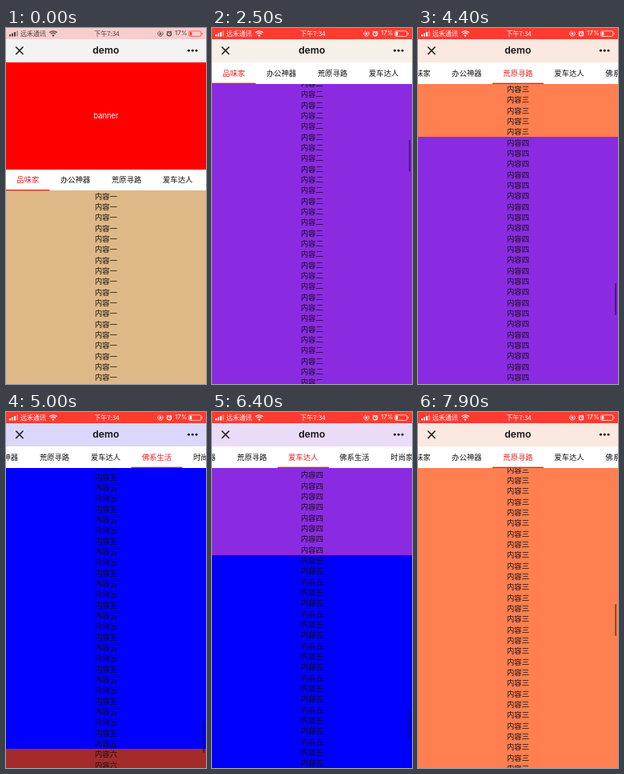
Animation of 250 by 445 pixels, one loop 8000 ms. Source, as an HTML page with a canvas:

```html
<!DOCTYPE html>
<html lang="zh">
<head>
<meta charset="utf-8">
<title>demo</title>
<style>
html, body { margin: 0; width: 100%; height: 100%; overflow: hidden; background: #fff; }
canvas { display: block; width: 250px; height: 445px; }
</style>
</head>
<body>
<canvas id="stage"></canvas>
<script>
const W = 250, H = 445, LOOP = 8000, STEP = 100;
const PT = 2 / 3;
const STATUS_H = 14, NAV_BOTTOM = 65 * PT, BANNER_H = 200 * PT, TAB_H = 40 * PT;
const CONTENT_TOP = NAV_BOTTOM + BANNER_H + TAB_H;
const ROW = 20 * PT, FONT = 14 * PT;
const SWITCH_LINE = 23, TAB_SLIDE = 300;
const CJK = '"Noto Sans CJK SC", "Noto Sans CJK", "Noto Sans", sans-serif';
const LATIN = 'Inter, Roboto, sans-serif';
const RED = [255, 59, 48], WHITE = [255, 255, 255];

const canvas = document.getElementById('stage');
const ctx = canvas.getContext('2d');
const dpr = window.devicePixelRatio || 1;
canvas.width = W * dpr;
canvas.height = H * dpr;

const clamp = (v, lo, hi) => Math.min(hi, Math.max(lo, v));
const mix = (a, b, p) => a.map((v, i) => v + (b[i] - v) * p);
const css = c => `rgb(${c.map(Math.round).join(',')})`;

// Page layout
const sections = [
  { label: '内容一', rows: 60, color: [222, 184, 135] },
  { label: '内容二', rows: 55, color: [138, 43, 226] },
  { label: '内容三', rows: 87, color: [255, 127, 80] },
  { label: '内容四', rows: 42, color: [138, 43, 226] },
  { label: '内容五', rows: 30, color: [0, 0, 255] },
  { label: '内容六', rows: 13, color: [165, 42, 42] }
];
let pageY = CONTENT_TOP;
for (const s of sections) {
  s.top = pageY;
  pageY += s.rows * ROW;
}
const MAX_SCROLL = pageY - 667 * PT;

const tabs = ['品味家', '办公神器', '荒原寻路', '爱车达人', '佛系生活', '时尚家居']
  .map(label => ({ label, w: label.length * FONT + 40 * PT }));
let stripW = 0;
for (const tab of tabs) {
  tab.x = stripW;
  stripW += tab.w;
}
const tabTarget = i => clamp(tabs[i].x + tabs[i].w / 2 - W / 2, 0, stripW - W);

// Scroll position: monotone cubic through a few poses
const poses = [
  [0, 0], [600, 0], [1500, 464.2], [3500, 1559.2], [5000, 3435.7], [5400, MAX_SCROLL],
  [6000, MAX_SCROLL], [6700, 2873], [6900, 2532.7], [7900, 1964.6], [8000, 1961.6]
];
const secant = i => (poses[i + 1][1] - poses[i][1]) / (poses[i + 1][0] - poses[i][0]);
const slopes = poses.map((_, i) => {
  if (i === 0 || i === poses.length - 1) return 0;
  const a = secant(i - 1), b = secant(i);
  return a * b > 0 ? 2 * a * b / (a + b) : 0;
});

function scrollAt(t) {
  let i = 0;
  while (i < poses.length - 2 && t >= poses[i + 1][0]) i++;
  const [t0, y0] = poses[i], [t1, y1] = poses[i + 1];
  const d = t1 - t0, u = (t - t0) / d, v = 1 - u;
  return y0 * (1 + 2 * u) * v * v + slopes[i] * d * u * v * v
    + y1 * u * u * (3 - 2 * u) - slopes[i + 1] * d * u * u * v;
}

function activeTab(scroll) {
  let active = 0;
  sections.forEach((s, i) => { if (s.top - scroll <= SWITCH_LINE) active = i; });
  return active;
}

// Times at which the highlighted tab changes
const switches = [];
for (let t = 0, last = 0; t < LOOP; t += 2) {
  const tab = activeTab(scrollAt(t));
  if (tab !== last) switches.push({ t, tab });
  last = tab;
}

function stripOffset(t) {
  let from = 0, to = 0, start = -TAB_SLIDE;
  const at = time => {
    const left = 1 - clamp((time - start) / TAB_SLIDE, 0, 1);
    return to + (from - to) * left * left;
  };
  for (const s of switches) {
    if (s.t > t) break;
    from = at(s.t);
    to = tabTarget(s.tab);
    start = s.t;
  }
  return at(t);
}

// Drawing helpers
function rect(x, y, w, h, color) {
  ctx.fillStyle = color;
  ctx.fillRect(x, y, w, h);
}

// Full-width band with edges on whole pixels, so neighbours leave no seam
function band(top, bottom, color) {
  const y = Math.round(top);
  rect(0, y, W, Math.round(bottom) - y, color);
}

function text(str, x, y, font, color, align = 'center') {
  ctx.font = font;
  ctx.fillStyle = color;
  ctx.textAlign = align;
  ctx.textBaseline = 'middle';
  ctx.fillText(str, x, y);
}

function arc(x, y, r, a = 0, b = Math.PI * 2) {
  ctx.beginPath();
  ctx.arc(x, y, r, a, b);
}

function line(...points) {
  ctx.beginPath();
  for (let i = 0; i < points.length; i += 2) ctx.lineTo(points[i], points[i + 1]);
  ctx.stroke();
}

function drawPage(scroll) {
  band(NAV_BOTTOM - scroll, NAV_BOTTOM + BANNER_H - scroll, '#f00');
  text('banner', W / 2, 110.5 - scroll, `${FONT}px ${LATIN}`, '#fff');
  for (const s of sections) {
    const y = s.top - scroll, h = s.rows * ROW;
    if (y > H || y + h < 0) continue;
    band(y, s === sections.at(-1) ? H : y + h, css(s.color));
    const first = Math.max(0, Math.floor(-y / ROW));
    for (let r = first; r < s.rows && y + r * ROW < H; r++) {
      text(s.label, W / 2, y + (r + 0.5) * ROW + 0.1, `${FONT}px ${CJK}`, '#111');
    }
  }
}

function drawTabs(t, scroll) {
  const y = Math.max(NAV_BOTTOM, NAV_BOTTOM + BANNER_H - scroll);
  const offset = stripOffset(t), active = activeTab(scroll);
  band(y, y + TAB_H, '#fff');
  tabs.forEach((tab, i) => {
    const x = tab.x - offset;
    text(tab.label, x + tab.w / 2, y + 13.1, `${FONT}px ${CJK}`, i === active ? '#e8201c' : '#111');
    if (i === active) rect(x, y + TAB_H - 2 * PT, tab.w, 2 * PT, '#d92a20');
  });
}

function colorBehind(y) {
  if (y < NAV_BOTTOM) return [200, 200, 200];
  if (y < NAV_BOTTOM + BANNER_H) return [255, 0, 0];
  return sections.filter(s => s.top <= y).pop()?.color || sections[0].color;
}

// Frosted bar: average of the colours underneath, mostly covered by white
function drawNav(scroll) {
  let tint = [0, 0, 0];
  const samples = 15;
  for (let i = 0; i < samples; i++) {
    const c = colorBehind(STATUS_H + i * 2 + scroll);
    tint = tint.map((v, k) => v + c[k] / samples);
  }
  band(STATUS_H, NAV_BOTTOM, css(mix(tint, [250, 250, 250], 0.855)));
  ctx.strokeStyle = '#111';
  ctx.lineWidth = 1.4;
  line(12.3, 23.5, 21.5, 32.9);
  line(21.5, 23.5, 12.3, 32.9);
  text('demo', 124.8, 28.5, `600 12.2px ${LATIN}`, '#111');
  ctx.fillStyle = '#111';
  for (const x of [228.4, 233.2, 238]) {
    arc(x, 28.2, 1.45);
    ctx.fill();
  }
}

function drawStatus(t) {
  const p = clamp(t / 500, 0, 1);
  const ink = css(mix([75, 65, 65], WHITE, p));
  band(0, STATUS_H, css(mix([248, 205, 203], RED, p)));
  for (let i = 0; i < 4; i++) {
    ctx.globalAlpha = i < 3 ? 1 : 0.4;
    rect(4 + i * 3, 8 - i * 1.5, 2, 2.5 + i * 1.5, ink);
  }
  ctx.globalAlpha = 1;
  text('远禾通讯', 18, 7, `8px ${CJK}`, ink, 'left');
  text('下午7:34', 126, 7, `8px ${CJK}`, ink);
  text('17%', 211, 7, `8px ${LATIN}`, ink, 'left');

  ctx.strokeStyle = ink;
  ctx.lineWidth = 1.3;
  for (const r of [3.8, 6.2]) {
    arc(59, 10, r, -Math.PI * 0.77, -Math.PI * 0.23);
    ctx.stroke();
  }
  ctx.fillStyle = ink;
  arc(59, 9.4, 1.2);
  ctx.fill();

  // rotation lock and alarm clock
  ctx.lineWidth = 0.8;
  arc(193, 7, 3.2, -1, 4.6);
  ctx.stroke();
  rect(191.7, 6.5, 2.6, 2, ink);
  arc(193, 6.3, 0.8, Math.PI, 0);
  ctx.stroke();
  ctx.lineWidth = 1.2;
  arc(204, 7.2, 2.6);
  ctx.stroke();
  ctx.lineWidth = 0.8;
  line(204, 5.6, 204, 7.3, 205.2, 7.3);
  line(200.8, 5, 202.2, 3.6);
  line(205.8, 3.6, 207.2, 5);

  const charge = css(mix(RED, WHITE, p));
  ctx.strokeStyle = charge;
  ctx.lineWidth = 0.7;
  ctx.beginPath();
  ctx.roundRect(228.8, 3.8, 15, 6.6, 1.3);
  ctx.stroke();
  rect(229.8, 4.8, 2.4, 4.6, charge);
  rect(244.6, 6, 1, 2.2, charge);
}

function drawThumb(t, scroll) {
  const fade = t < 600 ? 0 : t < 6000 ? clamp((5800 - t) / 300, 0, 1) : 1;
  ctx.fillStyle = `rgba(0,0,0,${0.5 * fade})`;
  ctx.beginPath();
  ctx.roundRect(246.3, 45 + scroll * 0.0992, 1.7, 40.2, 0.8);
  ctx.fill();
}

function render(now) {
  const t = Math.floor((now % LOOP) / STEP) * STEP;
  const scroll = scrollAt(t);
  ctx.setTransform(dpr, 0, 0, dpr, 0, 0);
  rect(0, 0, W, H, '#fff');
  drawPage(scroll);
  drawTabs(t, scroll);
  drawNav(scroll);
  drawStatus(t);
  drawThumb(t, scroll);
}

const start = performance.now();
function tick() {
  render(performance.now() - start);
  requestAnimationFrame(tick);
}
tick();
</script>
</body>
</html>
```
